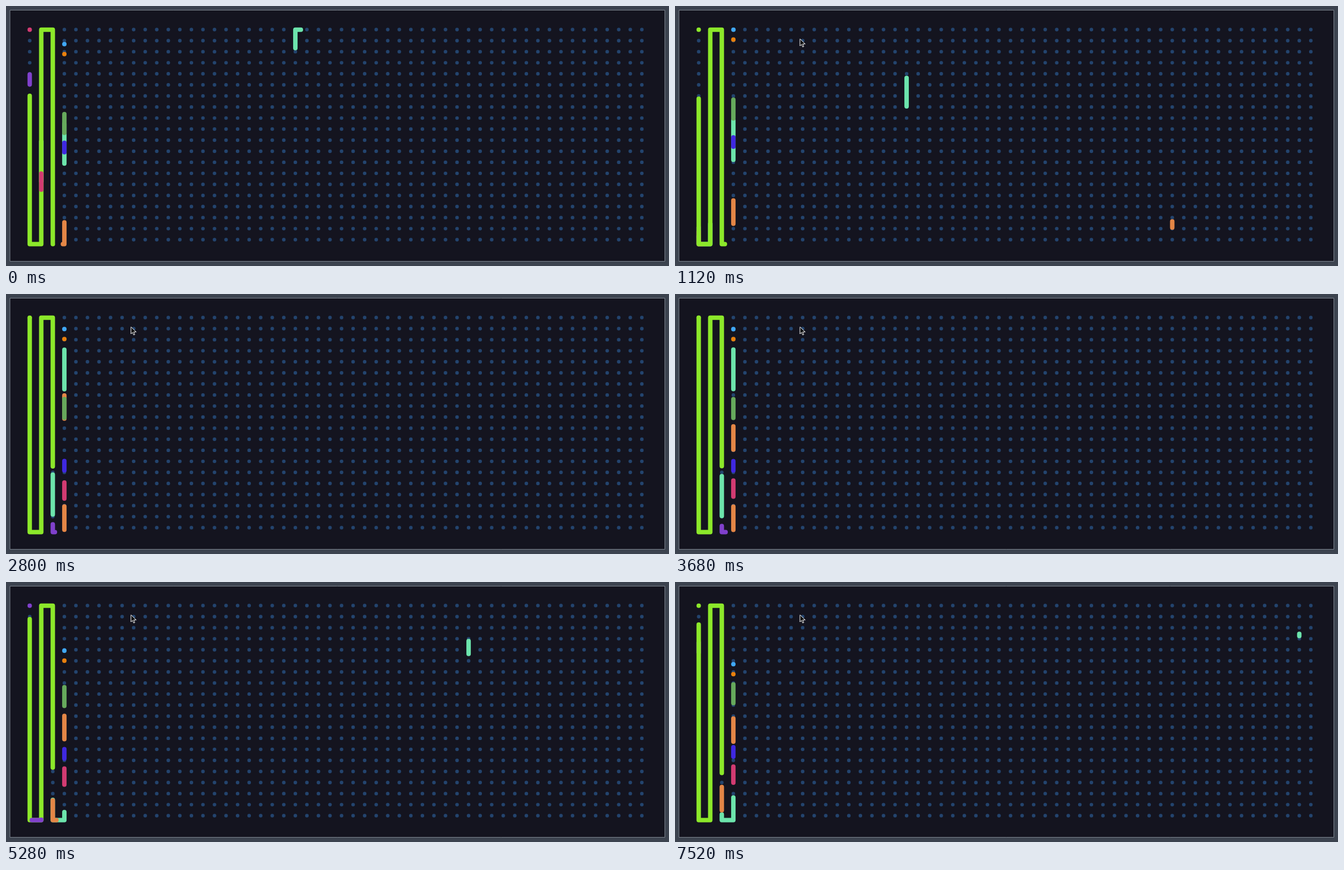
An HTML page with a canvas that plays this animation: 1194 px wide and 469 px high, repeating every 7.6 s.

```html
<!DOCTYPE html>
<html lang="en">
<head>
<meta charset="utf-8">
<title>Sliding beads</title>
<style>
  html, body { margin: 0; width: 100%; height: 100%; overflow: hidden; background: #3c434f; }
  canvas { display: block; }
</style>
</head>
<body>
<canvas id="c" width="1194" height="469"></canvas>
<script>
const ctx = document.getElementById('c').getContext('2d');
const LOOP = 7600, STEP = 80;

// One long path snakes down and up through all the columns.
const X0 = 42.7, Y0 = 42.8, DX = 20.8, H = 386.8, COLS = 54;
const PITCH = H + DX, END = COLS * PITCH - DX, FAR = 55 * PITCH, GAP = 18;

// Each bead has a length along the path and a colour.
const TEAL = '#6ce4ac', ORANGE = '#e48646';
const beads = {
  L: [1083, '#8ce82a'], U: [18, '#8040cc'], P: [29, '#d23b72'],
  O: [42, ORANGE], Q: [42, ORANGE],
  T: [72, TEAL], t: [72, TEAL], V: [72, TEAL],
  B: [17, '#3f28e0'], G: [34, '#66a95c'],
  o: [0, '#e8800e'], b: [0, '#40a8f8']
};

// Beads in an order sit one after another; the rest wait beyond the end.
function layout(order) {
  const at = {};
  for (const k in beads) at[k] = FAR;
  let s = 0;
  for (const k of order) { at[k] = s; s += beads[k][0] + GAP; }
  return at;
}

const first = { ...layout('ULOTPBGtob'), U: 133 };
const phases = [
  [-434, 'PUTLOtBGVob'],
  [905, 'LTUOPBQGtob'],
  [4790, 'ULOTPBQGob'],
  [7440, 'LTUOQPBtGob']
].map(([start, order]) => ({ start, order, to: layout(order) }));

// Share of the way still to go, as a damped spring.
function rest(ms) {
  const t = Math.max(0, ms / 1000);
  const u = Math.min(4.72 * t, 0.83 + 3.83 * t);
  return (1 + u) * Math.exp(-u);
}

function place(k, i, t) {
  if (i < 0) return first[k];
  const p = phases[i];
  const from = place(k, i - 1, p.start);
  return p.to[k] + (from - p.to[k]) * rest(t - p.start);
}

function point(s) {
  const col = Math.floor(s / PITCH), d = s - col * PITCH;
  const down = Math.min(d, H);
  return [X0 + col * DX + Math.max(0, d - H), col % 2 ? Y0 + H - down : Y0 + down];
}

function stroke(a, b, color) {
  if (a > END) return;
  a = Math.max(0, a);
  b = Math.min(END, Math.max(b, a + 0.05));
  ctx.beginPath();
  ctx.moveTo(...point(a));
  for (let c = Math.floor(a / PITCH); c * PITCH < b; c++)
    for (const s of [c * PITCH, c * PITCH + H])
      if (s > a && s < b) ctx.lineTo(...point(s));
  ctx.lineTo(...point(b));
  ctx.strokeStyle = color;
  ctx.lineWidth = 8;
  ctx.lineCap = ctx.lineJoin = 'round';
  ctx.stroke();
}

function board() {
  ctx.fillStyle = '#3c434f';
  ctx.fillRect(0, 0, 1194, 469);
  ctx.fillStyle = '#14141f';
  ctx.fillRect(7, 7, 1179, 453);
  ctx.strokeStyle = '#7d858f';
  ctx.lineWidth = 1;
  ctx.strokeRect(7.5, 7.5, 1179, 453);
  ctx.fillStyle = '#23446e';
  ctx.beginPath();
  for (let c = 0; c < COLS; c++)
    for (let r = 0; r < 20; r++) {
      const x = X0 + c * DX, y = 42.5 + r * 19.95;
      ctx.moveTo(x + 3.2, y);
      ctx.arc(x, y, 3.2, 0, 7);
    }
  ctx.fill();
}

function cursor(t) {
  const p = Math.min(1, (t - 160) / 560);
  if (p < 0) return;
  const far = (1 - p) ** 2;
  ctx.save();
  ctx.translate(225 + 375 * far, 59.5 + 400 * far);
  ctx.beginPath();
  for (const [x, y] of [[0, 0], [0, 12.5], [2.9, 9.8], [4.9, 14.4], [7, 13.5], [5, 9], [9, 9]])
    ctx.lineTo(x, y);
  ctx.closePath();
  ctx.fillStyle = '#111';
  ctx.fill();
  ctx.strokeStyle = '#fff';
  ctx.lineWidth = 1;
  ctx.lineJoin = 'miter';
  ctx.stroke();
  ctx.restore();
}

function draw(now) {
  const t = Math.floor(now % LOOP / STEP) * STEP;
  const i = phases.findLastIndex(p => p.start <= t);
  const { order } = phases[i];
  board();
  stroke(0, 0, beads[order[0]][1]);
  // The long bead covers the small ones when it leads.
  const layers = 'VtTQO' + (order[0] === 'L' ? 'UPL' : 'LUP') + 'BGob';
  for (const k of layers) {
    const s = place(k, i, t), [len, color] = beads[k];
    const scale = Math.min(1, 1.06 * (1 - s / FAR));
    stroke(s, s + len * scale, color);
  }
  cursor(t);
}

const begin = performance.now();
function frame() {
  draw(performance.now() - begin);
  requestAnimationFrame(frame);
}
frame();
</script>
</body>
</html>
```
